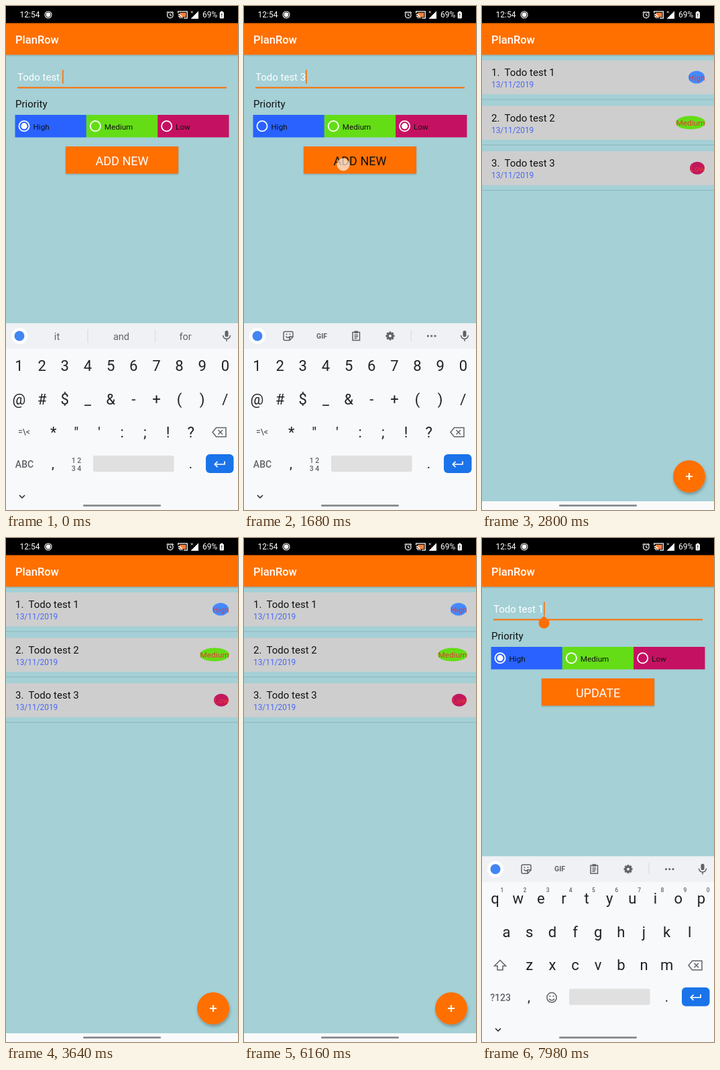
An HTML page that plays this animation: 346x750 px, repeating every 8000 ms.

```html
<!DOCTYPE html>
<html lang="en">
<head>
<meta charset="utf-8">
<title>Task list</title>
<style>
  html, body { margin: 0; height: 100%; overflow: hidden; background: #fafafa; }
  svg { display: block; width: 346px; height: 750px; font-family: Roboto, sans-serif; }
  text { white-space: pre; }
</style>
</head>
<body>
<svg id="stage" viewBox="0 0 346 750"></svg>
<script>
const LOOP = 8000, STEP = 140;
const ORANGE = '#ff6f00', INK = '#202124', GREY = '#5f6368';
const PRIORITIES = [
  { name: 'High', color: '#2962ff' },
  { name: 'Medium', color: '#64dd17' },
  { name: 'Low', color: '#c51162' }
];

// Markup helpers
const text = (x, y, size, fill, value, extra = '') =>
  `<text x="${x}" y="${y}" font-size="${size}" fill="${fill}" ${extra}>${value.replace(/&/g, '&amp;').replace(/</g, '&lt;')}</text>`;
const label = (x, y, size, fill, value, weight = 400) =>
  text(x, y, size, fill, value, `text-anchor="middle" font-weight="${weight}"`);
const rect = (x, y, w, h, fill, extra = '') =>
  `<rect x="${x}" y="${y}" width="${w}" height="${h}" fill="${fill}" ${extra}/>`;
const circle = (x, y, r, fill, extra = '') =>
  `<circle cx="${x}" cy="${y}" r="${r}" fill="${fill}" ${extra}/>`;
const line = (d, color = GREY, width = 1.5, fill = 'none') =>
  `<path d="${d}" stroke="${color}" stroke-width="${width}" fill="${fill}"/>`;
const group = (id, content) => `<g id="${id}">${content}</g>`;

const screenBase = () =>
  rect(0, 0, 346, 750, '#fafafa') + rect(0, 0, 346, 26, '#000') +
  rect(0, 72, 346, 665, '#a4d0d6') +
  rect(0, 25.5, 346, 47, ORANGE, 'filter="url(#soft)"') +
  text(14, 55.5, 16.5, '#fff', 'PlanRow', 'font-weight="500"');

function listScreen() {
  const badges = [
    { x: 320, rx: 12, ry: 9.5, color: '#448aff' },
    { x: 311, rx: 22, ry: 10, color: '#64dd17' },
    { x: 321, rx: 11, ry: 9.5, color: '#c2185b' }
  ];
  const rows = badges.map((badge, i) => {
    const y = 81 + 67.6 * i;
    return rect(0, y, 346, 50.5, '#cecece') +
      rect(0, y + 57.5, 346, 1.2, '#92bbc3') +
      text(14, y + 23, 15, '#111', `${i + 1}.  Todo test ${i + 1}`) +
      text(14, y + 40, 11.9, '#4a68f5', '13/11/2019') +
      `<ellipse cx="${badge.x}" cy="${y + 25}" rx="${badge.rx}" ry="${badge.ry}" fill="${badge.color}"/>` +
      text(332.5, y + 29.5, 11.8, '#e53935', PRIORITIES[i].name, 'text-anchor="end"');
  });
  return screenBase() + rows.join('') +
    circle(309, 700, 24, ORANGE, 'filter="url(#lift)"') +
    line('M304 700h10M309 695v10', '#fff', 2.2);
}

function formScreen() {
  const options = PRIORITIES.map(({ name, color }, i) => {
    const x = 13.5 + 106.3 * i;
    return rect(x, 162, 106.4, 33.5, color) +
      circle(x + 13.5, 178.7, 7.6, 'none', 'stroke="#fff" stroke-width="1.8"') +
      circle(x + 13.5, 178.7, 4.6, '#fff', 'class="radio"') +
      text(x + 27, 183.5, 11.7, '#111', name);
  });
  return screenBase() +
    text(17, 111, 15, '#fff', '', 'id="entry"') +
    rect(17, 120.5, 312, 2, ORANGE, 'id="underline"') +
    rect(0, 95, 1.6, 20.5, ORANGE, 'id="cursor"') +
    `<path id="handle" d="M92.5 116l5.6 5a8 8 0 1 1-11.2 0z" fill="${ORANGE}"/>` +
    text(14, 151, 15, '#111', 'Priority') + options.join('') +
    rect(89, 209, 168, 40.5, ORANGE, 'filter="url(#soft)"') +
    `<text id="action" x="173" y="236.8" font-size="18" text-anchor="middle"></text>`;
}

function keyboard() {
  const column = i => 19.5 + 34.15 * i;
  const keys = (chars, first, y) =>
    [...chars].map((c, i) => label(column(first + i), y, 22, INK, c)).join('');

  const suggestions = label(76, 496.5, 14.5, GREY, 'it') + label(172, 496.5, 14.5, GREY, 'and') +
    label(267.5, 496.5, 14.5, GREY, 'for') + line('M122 481v20M222.5 481v20', '#d5d8dc', 1);

  const teeth = Array.from({ length: 8 }, (_, i) =>
    `<path d="M218 484.5v3" stroke="${GREY}" stroke-width="3" transform="rotate(${45 * i} 218 491)"/>`).join('');
  const tools =
    line('M61 484.5h10a2 2 0 0 1 2 2v6l-5 5h-7a2 2 0 0 1-2-2v-9a2 2 0 0 1 2-2zM73 492h-3a2 2 0 0 0-2 2v3M62.5 491.5q3 4 6 0') +
    circle(63.5, 488.5, 1, GREY) + circle(68.5, 488.5, 1, GREY) +
    label(116, 494.5, 10.5, GREY, 'GIF', 700) +
    line('M162 485.5h10.5v12H162zM164.5 489.5h5.5M164.5 492h5.5M164.5 494.5h4') + rect(164.5, 483.5, 5.5, 3.5, GREY) +
    teeth + circle(218, 491, 3.6, 'none', `stroke="${GREY}" stroke-width="3"`) +
    line('M249 482v17', '#d5d8dc', 1) +
    [274.5, 279.7, 285].map(x => circle(x, 491, 1.6, GREY)).join('');

  const symbols = keys('1234567890', 0, 543) + keys('@#$_&-+()/', 0, 592.5) +
    keys('*"\':;!?', 1.5, 642) + label(27, 638, 12, GREY, '=\\<', 500) +
    label(27.5, 687, 14, GREY, 'ABC', 500) +
    label(105, 680, 10.5, GREY, '1 2', 500) + label(105, 691.5, 10.5, GREY, '3 4', 500);

  const letters = keys('qwertyuiop', 0, 542.5) + keys('asdfghjkl', 0.5, 592) + keys('zxcvbnm', 1.5, 641.5) +
    [...'1234567890'].map((c, i) => label(column(i) + 10.3, 525, 8.5, GREY, c, 500)).join('') +
    line('M27 626.5l8.5 8.5h-4.5v6h-8v-6h-4.5z') +
    label(27.5, 687, 14, GREY, '?123', 500) +
    circle(104, 682, 7.2, 'none', `stroke="${GREY}" stroke-width="1.5"`) +
    circle(101.5, 680, 1.1, GREY) + circle(106.5, 680, 1.1, GREY) + line('M100 684q4 4.5 8 0');

  return rect(0, 472, 346, 290, '#f8f9fb') + rect(0, 472, 346, 38, '#eff1f4') +
    circle(20, 491, 12, '#fff') + circle(20, 491, 7.5, '#4285f4') +
    group('suggestions', suggestions) + group('tools', tools) +
    rect(326.5, 483, 5, 9.5, GREY, 'rx="2.5"') + line('M323.5 490a5.5 5.5 0 0 0 11 0M329 495.5v3.5') +
    group('symbols', symbols) + group('letters', letters) +
    line('M313.5 627.5H328v13.5h-14.5l-5.5-6.7zM316.5 631l6.5 6.5M323 631l-6.5 6.5') +
    label(70, 688, 20, INK, ',') + label(275.5, 688, 20, INK, '.') +
    rect(130, 669, 120.5, 24, '#e0e0e0', 'rx="2"') +
    rect(298, 667, 41.5, 28, '#1a73e8', 'rx="6"') +
    line('M326 677.5v4.5h-14.5M315.5 677.8l-4.2 4.2 4.2 4.2', '#fff', 1.7) +
    line('M20 728l4 4 4-4', INK, 1.5);
}

const statusBar = () =>
  text(20.5, 17.3, 12, '#fff', '12:54') +
  circle(63, 13, 5, 'none', 'stroke="#fff" stroke-width="1.1"') + circle(63, 13, 3.4, '#fff') +
  circle(244.8, 13.5, 4.3, 'none', 'stroke="#fff" stroke-width="1.2"') +
  line('M244.8 11v2.7l2 1.3M239.5 10.3l2.6-2.2M250 10.3l-2.6-2.2', '#fff', 1.1) +
  rect(259, 10, 9.5, 6.5, '#f5803e') +
  line('M256.7 10.5v-2.3h13.6v10H265M256.7 12.5a6 6 0 0 1 6 6M256.7 15.2a3.3 3.3 0 0 1 3.3 3.3', '#fff', 1.3) +
  '<path d="M287 7.5v11.5h-11.5z" fill="#fff"/>' +
  line('M275.8 7.5l3 3M278.8 7.5l-3 3', '#fff', 0.9) +
  text(293, 17.3, 12, '#fff', '69%') +
  rect(318.7, 9, 6.2, 9.5, '#fff', 'rx="1"') + rect(320.3, 7.7, 3, 2, '#fff') +
  line('M321.8 11v3.5M321.8 15.5v1.2', '#000', 1);

document.getElementById('stage').innerHTML = `<defs>
  <filter id="soft" x="-5%" y="-20%" width="110%" height="150%"><feDropShadow dx="0" dy="1" stdDeviation="1" flood-opacity=".25"/></filter>
  <filter id="lift" x="-30%" y="-30%" width="160%" height="160%"><feDropShadow dx="1" dy="3" stdDeviation="2.2" flood-opacity=".28"/></filter>
</defs>` +
  group('list', listScreen()) + group('form', formScreen()) + group('keyboard', keyboard()) +
  rect(115, 742, 116, 2.8, '#85898d', 'rx="1.4"') + statusBar() +
  circle(0, 0, 9, '#fff', 'id="touch" fill-opacity=".65" stroke="#ddd" stroke-width=".8"');

const el = id => document.getElementById(id);
const radios = document.querySelectorAll('.radio');
const clamp = v => Math.max(0, Math.min(1, v));
const within = (t, from, to) => t >= from && t < to;
const show = (id, on) => el(id).setAttribute('display', on ? 'inline' : 'none');

const TAPS = [
  { x: 88, y: 537, from: 60, to: 260 },
  { x: 252, y: 180, from: 980, to: 1300 },
  { x: 148, y: 236, from: 1540, to: 1800 },
  { x: 110, y: 105, from: 6440, to: 6700 },
  { x: 110, y: 106, from: 7600, to: 7800 }
];
const CLOSE = 1720, OPEN = 6680, RAISE = 7760;

// Share of a window transition that is still to come
const remaining = (t, start) => Math.pow(1 - clamp((t - start) / 400), 3.3);

function place(id, scale, opacity) {
  el(id).setAttribute('transform', `translate(173 375) scale(${scale}) translate(-173 -375)`);
  el(id).setAttribute('opacity', opacity);
  show(id, opacity > 0);
}

function draw(t) {
  const editing = t >= 4000;

  if (editing) {
    const rest = remaining(t, OPEN);
    place('list', 1 + 0.1 * (1 - rest), 1);
    place('form', 1 - 0.15 * rest, clamp((t - OPEN - 35) / 85));
  } else {
    const rest = remaining(t, CLOSE);
    place('list', 1 + 0.1 * rest, 1);
    place('form', 1 - 0.1 * (1 - rest), 1 - clamp((t - CLOSE - 35) / 130));
  }

  const entry = editing ? 'Todo test 1' : t < 180 ? 'Todo test ' : 'Todo test 3';
  const focused = !editing || t >= 7700;
  const cursorOn = focused && !within(t, 680, 1180);
  el('entry').textContent = entry;
  el('cursor').setAttribute('x', entry.endsWith(' ') ? 84 : 92);
  show('cursor', cursorOn);
  show('handle', t >= 7840);
  el('underline').setAttribute('fill', focused ? ORANGE : '#6c8488');
  el('underline').setAttribute('height', focused ? 2 : 1);

  const selected = editing || t < 1100 ? 0 : 2;
  radios.forEach((radio, i) => radio.setAttribute('display', i === selected ? 'inline' : 'none'));
  el('action').textContent = editing ? 'UPDATE' : 'ADD NEW';
  el('action').setAttribute('fill', within(t, 1540, 2000) ? '#111' : '#fff');

  const drop = editing
    ? Math.pow(1 - clamp((t - RAISE) / 270), 3)
    : Math.pow(clamp((t - CLOSE) / 200), 2);
  el('keyboard').setAttribute('transform', `translate(0 ${278 * drop})`);
  show('keyboard', drop < 1);
  show('suggestions', t < 400);
  show('tools', t >= 400);
  show('symbols', !editing);
  show('letters', editing);

  const tap = TAPS.find(({ from, to }) => within(t, from, to));
  show('touch', tap);
  if (tap) el('touch').setAttribute('transform', `translate(${tap.x} ${tap.y})`);
}

function tick() {
  const t = performance.now() % LOOP;
  draw(Math.floor(t / STEP) * STEP);
  requestAnimationFrame(tick);
}
tick();
</script>
</body>
</html>
```
